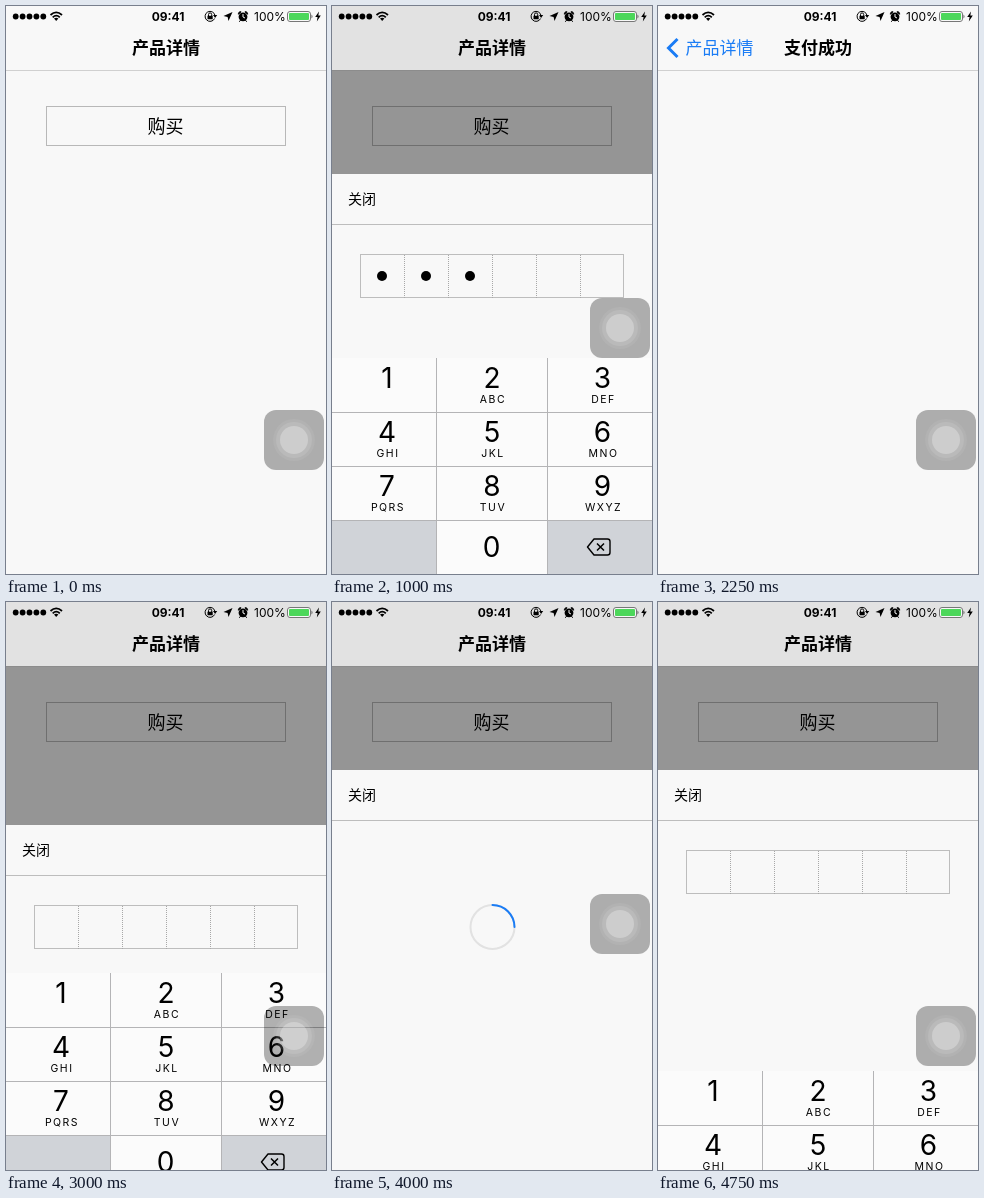
An HTML page that plays this animation: 320x568 px, repeating every 5 s.

```html
<!DOCTYPE html>
<html lang="zh-CN">
<head>
<meta charset="utf-8">
<style>
  html, body { margin: 0; width: 100%; height: 100%; overflow: hidden; background: #f8f8f8; }
  svg { display: block; width: 320px; height: 568px; }
  text { font-family: Inter, "Noto Sans CJK SC", "Noto Sans CJK", sans-serif; text-anchor: middle; fill: #000; }
  .bold { font-weight: 700; }
  .title { font-size: 17px; }
  .blue { fill: #1a7cf5; }
  .line { fill: none; stroke: #bdbdbd; stroke-width: 1; }
  .digit { font-size: 28px; }
  .letters { font-size: 10.5px; letter-spacing: 1.5px; }
</style>
</head>
<body>
<svg viewBox="0 0 320 568">
  <defs>
    <linearGradient id="edge">
      <stop offset="0" stop-opacity="0"/>
      <stop offset="1" stop-opacity=".12"/>
    </linearGradient>
  </defs>
  <rect width="320" height="568" fill="#f8f8f8"/>

  <g id="home">
    <rect class="line" x="40.5" y="100.5" width="239" height="39" style="stroke:#b8b8b8"/>
    <text x="159.5" y="126.8" font-size="18">购买</text>
  </g>
  <rect id="pageEdge" x="277" y="65" width="9" height="503" fill="url(#edge)"/>
  <rect id="shadeBelow" y="65" width="320" height="503" opacity=".4"/>

  <g id="panel">
    <rect y="168" width="320" height="400" fill="#f8f8f8"/>
    <text x="30" y="198.3" font-size="14">关闭</text>
    <path class="line" d="M0 218.5H320"/>
    <g id="cells">
      <rect class="line" x="28.5" y="248.5" width="263" height="43"/>
      <path id="cellLines" class="line" stroke-dasharray="1 1" style="stroke:#a8a8a8"/>
      <g id="dots"></g>
    </g>
    <g id="spinner" fill="none" stroke-width="2">
      <circle cx="160.5" cy="325" r="22" stroke="#e2e2e2"/>
      <path id="arc" d="M160.5 303A22 22 0 0 1 182.5 325" stroke="#1a7cf5" stroke-linecap="round"/>
    </g>
  </g>

  <g id="keyboard">
    <rect y="352" width="320" height="216" fill="#fbfbfb"/>
    <path d="M0 514H105V568H0ZM215 514H320V568H215Z" fill="#d0d3d8"/>
    <path class="line" d="M0 406.5H320M0 460.5H320M0 514.5H320M104.5 352V568M215.5 352V568" style="stroke:#b4b4b6"/>
    <g id="keys"></g>
    <path d="M262 533H275.5Q278 533 278 535.5V546.5Q278 549 275.5 549H262L255.5 541Z" fill="none" stroke="#000" stroke-width="1.4" stroke-linejoin="round"/>
    <path d="M265 537.5L272 544.5M272 537.5L265 544.5" stroke="#000" stroke-width="1.5"/>
  </g>

  <rect id="shadeAbove" y="65" width="320" height="503" opacity=".4"/>
  <g id="alert">
    <rect x="30" y="308" width="260" height="120" rx="10" fill="#f9f9f9"/>
    <text x="58" y="348" font-size="12.3" style="text-anchor:start">支付密码不正确，你还可以输入3次。</text>
    <path d="M160.5 388V428" stroke="#e6e6e6" stroke-dasharray="1 1"/>
    <text class="bold blue" x="100" y="413.3" font-size="14">重新输入</text>
    <text class="blue" x="220" y="413.3" font-size="14">忘记密码</text>
  </g>

  <rect id="bar" width="320" height="64"/>
  <rect id="barLine" y="64" width="320" height="1"/>
  <text id="homeTitle" class="title bold" x="160" y="48.2">产品详情</text>
  <g id="doneBar">
    <path d="M19.5 33L10.5 42L19.5 51" fill="none" stroke="#1a7cf5" stroke-width="3"/>
    <text class="title blue" x="61.5" y="48.2">产品详情</text>
    <text class="title bold" x="160" y="48.2">支付成功</text>
  </g>

  <g id="status">
    <g id="signal"></g>
    <g fill="none" stroke="#000" stroke-width="1.8">
      <path d="M44.5 9Q50.2 3.8 56 9M46.7 11.3Q50.2 8 53.8 11.3"/>
    </g>
    <path d="M50.2 15L48 12.6Q50.2 10.8 52.4 12.6Z"/>
    <text class="bold" x="162" y="15" font-size="12">09:41</text>
    <g fill="none" stroke="#000">
      <path d="M208.6 12.5A5 5 0 1 1 209 9.5"/>
      <path d="M202.5 10V8.5A1.6 1.6 0 0 1 205.7 8.5V10"/>
    </g>
    <path d="M201.5 9.7H206.7V13.3H201.5ZM207 9H211.2L209.1 12Z"/>
    <path d="M226.5 6L222.5 15L221.6 10.9L217.5 10Z"/>
    <circle cx="237" cy="10.8" r="4.4"/>
    <path d="M232.5 8.3A2 2 0 0 1 235 5.8ZM241.5 8.3A2 2 0 0 0 239 5.8ZM233.3 15.8L234.8 13.8M240.7 15.8L239.2 13.8" stroke="#000"/>
    <path d="M237 8V11L239 12" fill="none" stroke="#f8f8f8"/>
    <text x="264" y="15" font-size="12">100%</text>
    <rect x="281.5" y="5.5" width="23" height="10" rx="2.5" fill="#f8f8f8" stroke="#777"/>
    <rect x="283" y="7" width="20" height="7" rx="1" fill="#4cd75a"/>
    <path d="M305.5 8.5Q307.5 10.5 305.5 12.5Z" fill="#555"/>
    <path d="M313 5.5L309.2 11H311.6L310.8 15.5L314.8 9.6H312.3Z"/>
  </g>

  <g id="touch">
    <rect x="258" width="60" height="60" rx="12" opacity=".3"/>
    <g fill="#fff">
      <circle cx="288" cy="30" r="21" opacity=".06"/>
      <circle cx="288" cy="30" r="18" opacity=".1"/>
      <circle cx="288" cy="30" r="14" opacity=".28"/>
    </g>
  </g>
</svg>
<script>
const NS = 'http://www.w3.org/2000/svg';
const $ = id => document.getElementById(id);

function add(parent, tag, attrs, text = '') {
  const el = document.createElementNS(NS, tag);
  for (const k in attrs) el.setAttribute(k, attrs[k]);
  el.textContent = text;
  $(parent).append(el);
  return el;
}

for (let i = 0; i < 5; i++) add('signal', 'circle', { cx: 9.7 + i * 6.9, cy: 10.5, r: 2.9 });
$('cellLines').setAttribute('d', [1, 2, 3, 4, 5].map(i => `M${28.5 + i * 44} 249V292`).join(''));
const dots = [0, 1, 2, 3, 4, 5].map(i => add('dots', 'circle', { cx: 50 + i * 44, cy: 270, r: 5 }));

const columns = [55, 160, 270.5];
['', 'ABC', 'DEF', 'GHI', 'JKL', 'MNO', 'PQRS', 'TUV', 'WXYZ'].forEach((letters, i) => {
  const x = columns[i % 3], y = 54 * Math.floor(i / 3);
  add('keys', 'text', { class: 'digit', x, y: 381.7 + y }, i + 1);
  add('keys', 'text', { class: 'letters', x: x + 1, y: 397 + y }, letters);
});
add('keys', 'text', { class: 'digit', x: 159.5, y: 551.2 }, 0);

// scene, touch button y, panel offset, keyboard offset, dots
const STEP = 250, LOW = 404, HIGH = 292, HIDDEN = 216;
const steps = [
  ['home', LOW],
  ['input', LOW, 12, 3, 0],
  ['input', LOW, 0, 0, 0],
  ['input', HIGH, 0, 0, 2],
  ['input', HIGH, 0, 0, 3],
  ['load', HIGH, 0, 120],
  ['load', HIGH, 0, HIDDEN],
  ['load', LOW, 0, HIDDEN],
  ['load', LOW, 0, HIDDEN],
  ['done', LOW],
  ['pop', LOW],
  ['home', LOW],
  ['input', LOW, 55, 19, 0],
  ['input', LOW, 0, 0, 0],
  ['input', HIGH, 0, 0, 3],
  ['load', HIGH, 0, 120],
  ['load', HIGH, 0, HIDDEN],
  ['alert', LOW, 0, HIDDEN],
  ['alert', LOW, 0, HIDDEN],
  ['input', LOW, 0, 117, 0]
];

const show = (id, on) => { $(id).style.display = on ? '' : 'none'; };
const move = (id, x, y) => $(id).setAttribute('transform', `translate(${x} ${y})`);

function draw(index) {
  const [scene, touchY, panelY = 0, keyY = HIDDEN, count = 0] = steps[index];
  const sheet = ['input', 'load', 'alert'].includes(scene);
  const pop = scene === 'pop';
  show('home', scene !== 'done');
  show('panel', sheet);
  show('keyboard', sheet && keyY < HIDDEN);
  show('cells', scene === 'input');
  show('spinner', scene === 'load');
  show('shadeBelow', sheet && scene !== 'alert');
  show('shadeAbove', scene === 'alert');
  show('alert', scene === 'alert');
  show('pageEdge', pop);
  show('homeTitle', scene !== 'done');
  show('doneBar', scene === 'done');
  move('home', pop ? -10 : 0, 0);
  move('homeTitle', pop ? -11 : 0, 0);
  move('panel', 0, panelY);
  move('keyboard', 0, keyY);
  move('touch', 0, touchY);
  $('bar').setAttribute('fill', sheet ? '#e2e2e2' : '#f8f8f8');
  $('barLine').setAttribute('fill', sheet ? '#8c8c8c' : '#d0d0d0');
  $('arc').setAttribute('transform', `rotate(${index * 90} 160.5 325)`);
  dots.forEach((dot, i) => dot.setAttribute('visibility', i < count ? 'visible' : 'hidden'));
}

let shown = -1;
function tick() {
  const index = Math.floor(performance.now() / STEP) % steps.length;
  if (index !== shown) draw(shown = index);
  requestAnimationFrame(tick);
}
tick();
</script>
</body>
</html>
```
